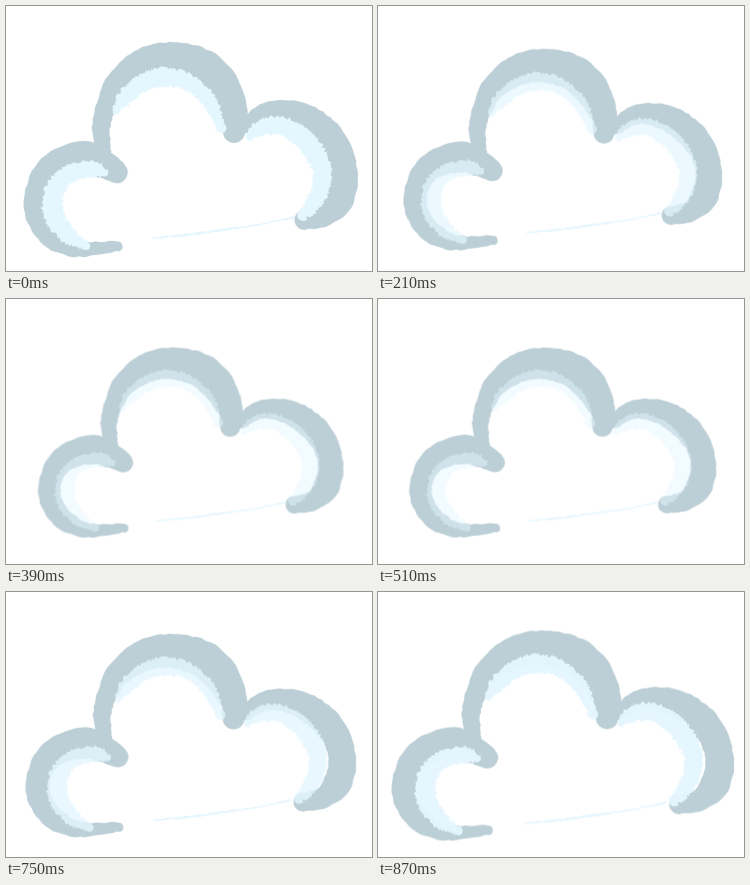
An HTML page that plays this animation: 366 by 265 pixels, repeating every 0.9 s.

```html
<!DOCTYPE html>
<html lang="en">
<head>
<meta charset="utf-8">
<title>Cloud</title>
<style>
  html, body { margin: 0; width: 100%; height: 100%; overflow: hidden; background: #fff; }
  svg { display: block; width: 366px; height: 265px; }
  g { transform-origin: 184.5px 143.3px; }
  #outline { fill: #bccfd6; }
  #glow, #base { fill: #e4f6fe; }
</style>
</head>
<body>
<svg viewBox="0 0 366 265">
  <g id="outline"></g>
  <g id="base"></g>
  <g id="glow"></g>
</svg>
<script>
const LOOP = 900;

// Each brush stroke is a few key points: x, y, half width
const strokes = {
  outline: [
    '114,168,11 82,152,16 55,157,15 37,172,13 30,197,12 36,219,12 52,235,11 74,243,8 112,240,5',
    '97,146,8 95,122,9 100,101,10 112,78,13 135,60,16 163,54,18 196,62,19 217,83,18 228,107,14 228,128,11',
    '240,120,8 257,108,10 278,106,12 299,112,14 320,128,15 333,148,14 338,172,14 333,194,14 319,209,11 298,214,10'
  ],
  glow: [
    '101,168,4 86,163,8 60,170,9 47,190,10 49,212,10 63,230,8 80,240,4',
    '109,106,3 121,89,8 141,75,9 163,71,9 187,79,8 205,98,7 216,125,4',
    '241,133,3 255,122,8 277,120,9 298,133,10 313,155,10 316,177,9 308,196,8 297,209,5'
  ],
  base: ['147,232,1 180,229,1 215,224,1.2 250,219,.7 289,211,1']
};

function random(seed) {
  return () => {
    seed = (seed * 16807) % 2147483647;
    return seed / 2147483647;
  };
}

function spline(a, b, c, d, t) {
  const cubic = 3 * (b - c) + d - a;
  const square = 2 * a - 5 * b + 4 * c - d;
  return b + 0.5 * t * (c - a + t * (square + t * cubic));
}

// Smooth curve through the key points, sampled about every `step` pixels
function sample(text, step) {
  const keys = text.split(' ').map(s => s.split(',').map(Number));
  const last = keys.length - 1;
  const at = i => keys[Math.min(last, Math.max(0, i))];
  const out = [];
  for (let i = 0; i < last; i++) {
    const [a, b, c, d] = [at(i - 1), at(i), at(i + 1), at(i + 2)];
    const parts = Math.ceil(Math.hypot(c[0] - b[0], c[1] - b[1]) / step);
    for (let j = 0; j < parts; j++) {
      out.push(b.map((_, k) => spline(a[k], b[k], c[k], d[k], j / parts)));
    }
  }
  return [...out, keys[last]];
}

// Fill both sides of each curve with a rough edge and round ends
function brush(id, step, rough) {
  const rnd = random(77);
  const layer = document.getElementById(id);
  for (const text of strokes[id]) {
    const pts = sample(text, step);
    const n = pts.length;
    const side = sign => pts.map(([x, y, r], i) => {
      const a = pts[Math.max(0, i - 1)], b = pts[Math.min(n - 1, i + 1)];
      const dx = b[0] - a[0], dy = b[1] - a[1];
      const push = sign * (r + (rnd() * 2 - 1) * rough) / Math.hypot(dx, dy);
      return `${(x + dy * push).toFixed(2)} ${(y - dx * push).toFixed(2)}`;
    });
    const left = side(1), right = side(-1).reverse();
    const cap = r => `A${r} ${r} 0 0 1 `;
    const path = document.createElementNS('http://www.w3.org/2000/svg', 'path');
    path.setAttribute('d', 'M' + left.join('L') + cap(pts[n - 1][2])
      + right.join('L') + cap(pts[0][2]) + left[0] + 'Z');
    layer.append(path);
  }
  return layer;
}

// Squeeze to the middle of the loop, then stretch to `end`, fading on the way
function breathe(layer, fade, end) {
  layer.animate([
    { transform: 'scale(1)', opacity: 1 },
    { transform: 'scale(0.9, 0.867)', opacity: fade },
    { transform: `scale(${end})`, opacity: 1 }
  ], { duration: LOOP, iterations: Infinity });
}

breathe(brush('outline', 4, 0.7), 1, '1.033, 0.985');
breathe(brush('base', 3, 0.5), 0.85, '1, 1');
breathe(brush('glow', 1.2, 1.7), 0.4, '1, 1');
</script>
</body>
</html>
```
